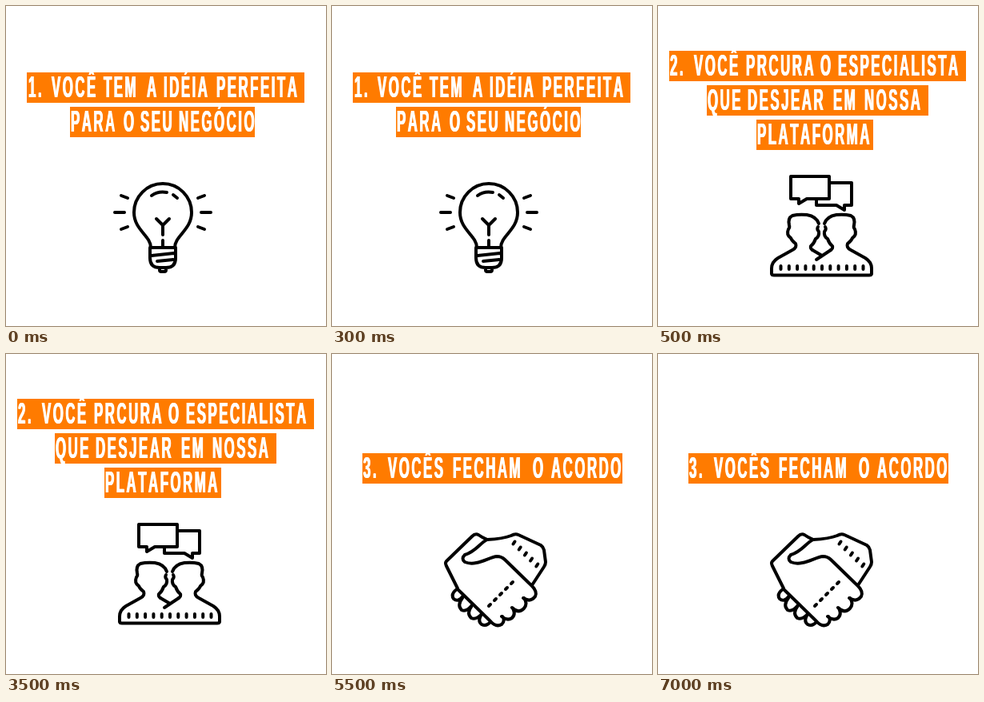
Recreate the animation shown at these times as an HTML page. Size 400x400 px, loop 8000 ms.

```html
<!DOCTYPE html>
<html lang="pt">
<head>
<meta charset="utf-8">
<title>Três passos</title>
<style>
  html, body { margin: 0; width: 100%; height: 100%; overflow: hidden; background: #fff; }
  .step { position: absolute; left: 0; top: 0; width: 400px; height: 400px; visibility: hidden; animation: 8s step-end infinite; }
  #idea { animation-name: first; }
  #search { animation-name: second; }
  #deal { animation-name: third; }
  @keyframes first { 0% { visibility: visible } 6.25%, 100% { visibility: hidden } }
  @keyframes second { 0% { visibility: hidden } 6.25% { visibility: visible } 68.75%, 100% { visibility: hidden } }
  @keyframes third { 0% { visibility: hidden } 68.75%, 100% { visibility: visible } }

  .line { position: absolute; left: var(--x); top: var(--y); width: var(--w); height: 37.5px; background: #ff7b00; }
  /* one condensed bold style for every word */
  .line b {
    position: absolute; left: calc(var(--at) * 1px); top: 0;
    font: bold 37.4px/37px "Liberation Sans", Arial, sans-serif;
    font-kerning: none; letter-spacing: 5.6px; white-space: pre; color: #fff;
    text-shadow: 1px 0, -1px 0;
    transform: scaleX(.45); transform-origin: 0 0;
  }
  svg { position: absolute; left: 0; top: 0; fill: none; stroke: #000; stroke-width: 4; stroke-linecap: round; stroke-linejoin: round; }
</style>
</head>
<body>
<div class="step" id="idea">
  <div class="line" style="--x:26px;--y:83px;--w:347px">
    <b style="--at:2">1.</b> <b style="--at:31">VOCÊ</b> <b style="--at:96">TEM</b> <b style="--at:150">A</b> <b style="--at:171">IDÉIA</b> <b style="--at:237">PERFEITA</b>
  </div>
  <div class="line" style="--x:80px;--y:126px;--w:231px">
    <b style="--at:1">PARA</b> <b style="--at:67">O</b> <b style="--at:88">SEU</b> <b style="--at:136">NEGÓCIO</b>
  </div>
  <svg width="400" height="400">
    <path d="M181 302C181 287 160 280 160 258A36 36 0 0 1 232 258C232 280 211 287 211 302"/>
    <path d="M180 302H212V315Q212 327 200 327H192Q180 327 180 315ZM182 312L210 309M189 319L209 317M192 328V330Q192 332 194 332H198Q200 332 200 330V328"/>
    <path d="M182 237Q190 231 201 233M209 236L214 240M188 266L196 274L204 266M196 274V286M196 293V300"/>
    <path d="M136 258H148M244 258H256M144 237L152 240M240 240L248 237M144 279L152 276M240 276L248 279"/>
  </svg>
</div>

<div class="step" id="search">
  <div class="line" style="--x:13.5px;--y:56px;--w:371.5px">
    <b style="--at:1.5">2.</b> <b style="--at:31.5">VOCÊ</b> <b style="--at:96.5">PRCURA</b> <b style="--at:189">O</b> <b style="--at:211">ESPECIALISTA</b>
  </div>
  <div class="line" style="--x:61px;--y:99px;--w:277px">
    <b style="--at:1">QUE</b> <b style="--at:51">DESJEAR</b> <b style="--at:158">EM</b> <b style="--at:197">NOSSA</b>
  </div>
  <div class="line" style="--x:122.5px;--y:142px;--w:146px">
    <b style="--at:1">PLATAFORMA</b>
  </div>
  <svg width="400" height="400">
    <defs>
      <path id="head" d="M142 334V328Q142 320 150 315L168 305Q174 302 172 297Q167 293 166 290Q160 286 163 279Q165 277 164 274Q162 265 168 262Q176 260 186 261Q198 263 201 272M200 276Q198 279 201 282Q202 288 197 291Q195 297 191 300Q190 303 193 305"/>
    </defs>
    <path d="M198 241H186L176 247V241H166V213H214V241H198M214 221H242V249H233V255L223 249H198V241"/>
    <use href="#head"/>
    <use href="#head" transform="matrix(-1 0 0 1 409 0)"/>
    <path d="M193 305L205 312M216 305L198 317M142 334Q142 336.500 145 336.500H264Q267 336.500 267 334"/>
    <path id="ticks"/>
  </svg>
</div>

<div class="step" id="deal">
  <div class="line" style="--x:37.5px;--y:124px;--w:325px">
    <b style="--at:1">3.</b> <b style="--at:32">VOCÊS</b> <b style="--at:113">FECHAM</b> <b style="--at:213">O</b> <b style="--at:236">ACORDO</b>
  </div>
  <svg width="400" height="400">
    <path d="M194 232Q187 229 183 226Q179 224 175 228L143 259Q141 261 143 265L157 293"/>
    <path d="M194 232Q214 231 224 227Q229 224 233 226L261 239Q264 241 265 245L267 260Q267 263 265 266L250 289"/>
    <path d="M194 232C185 236 180 247 166 251Q161 256 166 260C180 266 196 254 206 253Q212 253 216 257L250 290Q257 297 254 303Q248 311 239 305"/>
    <path d="M240 305Q245 312 240 318Q233 325 225 317M226 318Q230 325 225 330Q219 334 212 328M157 294L198 334Q205 342 212 338Q217 333 213 328"/>
    <path d="M156 294Q148 300 152 306Q158 311 164 302M163 305Q156 314 162 320Q168 323 175 314M174 316Q168 324 174 330Q180 333 187 325M186 327Q182 334 187 338Q193 341 198 335"/>
    <path id="cuffs"/>
  </svg>
</div>

<script>
  const repeat = (count, mark) => Array.from({ length: count }, (_, i) => mark(i)).join("");
  const draw = (id, d) => document.getElementById(id).setAttribute("d", d);
  draw("ticks", repeat(11, i => `M${153.5 + i * 10.3} 325v4`));
  draw("cuffs",
    repeat(5, i => `M${226.5 + i * 7.2} ${237.5 + i * 7}l2 -3`) +
    repeat(5, i => `M${196 + i * 7} ${315 - i * 7}l2 -2`));
</script>
</body>
</html>
```
